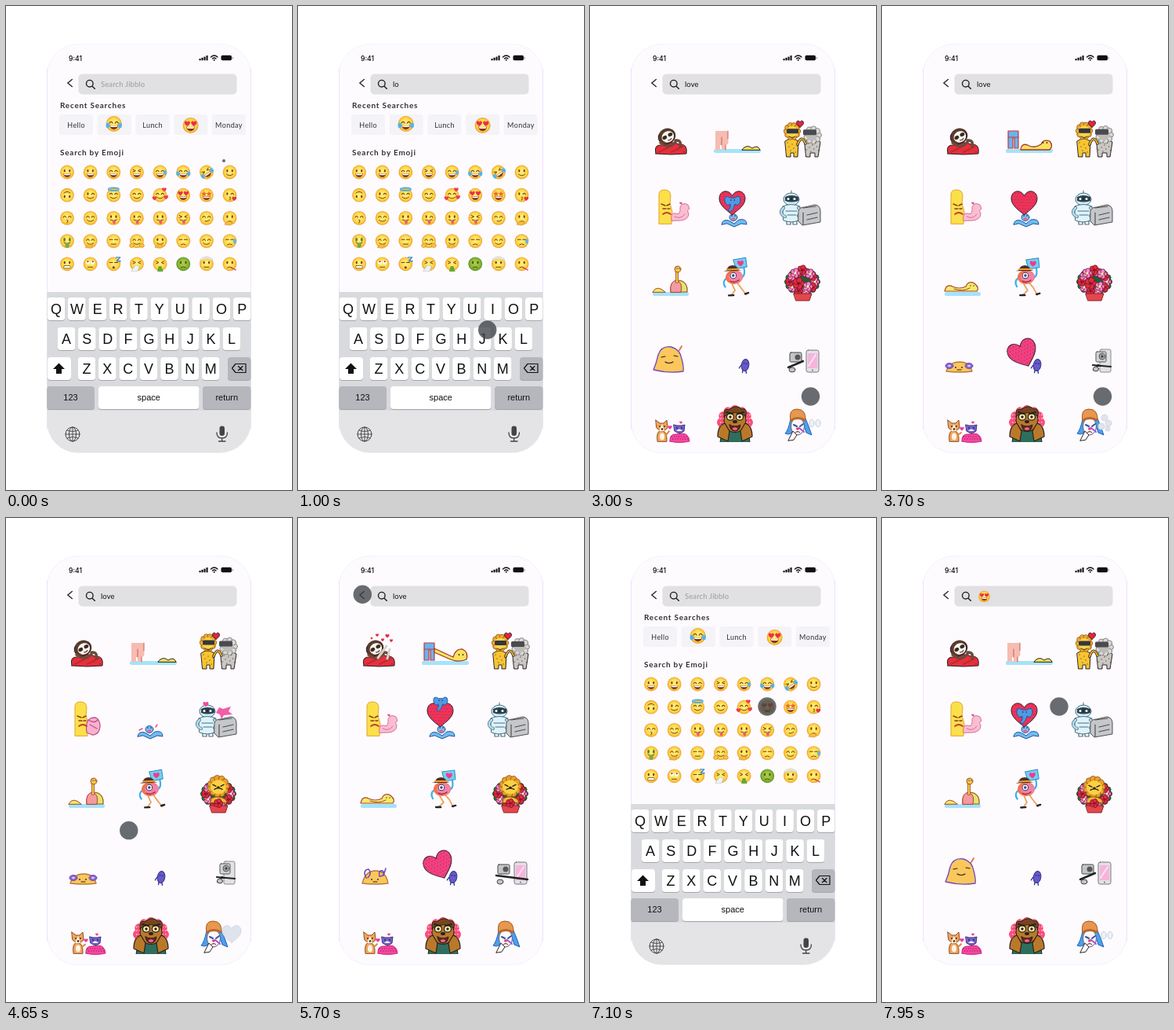
An HTML page with a canvas for the animation above (8000 ms loop, 365 by 616 pixels).

```html
<!DOCTYPE html>
<html lang="en">
<head>
<meta charset="utf-8">
<title>Sticker search</title>
<style>
html, body { margin: 0; width: 100%; height: 100%; overflow: hidden; background: #fff; }
canvas { display: block; }
</style>
</head>
<body>
<canvas id="stage" width="365" height="616"></canvas>
<script>
const c = document.getElementById('stage').getContext('2d');
const LOOP = 8000, TAU = Math.PI * 2, INK = '#2b2024', PAPER = '#fefbff', LATO = 'Lato, sans-serif', ARIAL = '"Liberation Sans", sans-serif';

// ---------- drawing helpers ----------
function paint(p, fill, stroke, w = 1) {
  if (fill) { c.fillStyle = fill; c.fill(p); }
  if (stroke) { c.strokeStyle = stroke; c.lineWidth = w; c.stroke(p); }
}
const path = (d, fill, stroke, w) => paint(new Path2D(d), fill, stroke, w);
function disc(x, y, rx, fill, ry = rx, stroke, w) {
  const p = new Path2D();
  p.ellipse(x, y, rx, ry, 0, 0, TAU);
  paint(p, fill, stroke, w);
}
function box(x, y, w, h, r, fill, stroke, lw) {
  const p = new Path2D();
  p.roundRect(x, y, w, h, r);
  paint(p, fill, stroke, lw);
}
function text(s, x, y, font, fill, align = 'left', spacing = 0) {
  c.font = font; c.fillStyle = fill; c.textAlign = align;
  c.letterSpacing = spacing + 'px';
  c.fillText(s, x, y);
}
function at(x, y, scale, turn, draw) {
  c.save(); c.translate(x, y); c.rotate(turn); c.scale(scale, scale); draw(); c.restore();
}
function ring(x, y, rx, ry, count, r, fill, stroke, w) {
  for (let i = 0; i < count; i++) {
    const angle = i * TAU / count;
    disc(x + rx * Math.cos(angle), y + ry * Math.sin(angle), r, fill, r, stroke, w);
  }
}
const HEART = 'M0 .95C-.5 .55-1 .2-1-.3C-1-.95-.25-1.05 0-.5C.25-1.05 1-.95 1-.3C1 .2 .5 .55 0 .95Z';
const heart = (x, y, s, fill, stroke, turn = 0) =>
  at(x, y, s, turn, () => path(HEART, fill, stroke, 1 / s));
function dottedHeart(x, y, s, fill, dot, turn = 0) {
  heart(x, y, s, fill, INK, turn);
  at(x, y, s, turn, () => {
    c.clip(new Path2D(HEART));
    for (let i = 0; i < 90; i++) disc(i % 10 * .22 - 1 + (i / 10 & 1) * .11, (i / 10 | 0) * .23 - .9, .045, dot);
  });
}

// ---------- emoji: eyes, mouth, extras ----------
const EMOJI = [
  'oG oG ^G xG ^GS ^GT xGTR os', 'osU ws ^sH ^s ^sL hG sG wkP',
  '^k ^st ot wt ot xt ^m onK', 'otM ^sK -f ^sA osK -n ^s -nS',
  'og rf -oZ xfN xoV onG ofB onE'].map(row => row.split(' '));
const BROWN = '#6b3d12';

function emoji(x, y, r, [eyes, mouth, ...more]) {
  const has = k => more.includes(k);
  const turn = has('U') ? Math.PI : has('R') ? -.6 : 0;
  at(x, y, r, turn, () => {
    c.lineCap = 'round';
    const g = c.createRadialGradient(0, -.15, .1, 0, 0, 1);
    (has('G') ? ['#a9cf45', '#85b637', '#578f24'] : ['#fff07c', '#fdd446', '#eb9d2b'])
      .forEach((k, i) => g.addColorStop([0, .72, 1][i], k));
    disc(0, 0, 1, g);
    for (const s of [-1, 1]) {
      c.save(); c.translate(s * .36, -.2); c.scale(s, 1);
      if (eyes === 'h') heart(.06, -.04, .36, '#ec2f48');
      else if (eyes === 's') path('M0-.4L.11-.12.4-.1.18.1.26.36 0 .22-.26.36-.18.1-.4-.1-.11-.12Z', '#ec6a2e');
      else if (eyes === '^' || eyes === 'w' && s > 0) path('M-.2 .1Q0-.22 .2 .1', null, BROWN, .12);
      else if (eyes === 'x') path('M.2-.18L-.18 0 .2 .16', null, BROWN, .11);
      else if (eyes === '-') path('M-.22 0H.22', null, BROWN, .12);
      else if (eyes === 'r') { disc(0, 0, .27, '#fff'); disc(0, -.14, .12, BROWN); }
      else disc(0, 0, .12, BROWN, .2);
      c.restore();
    }
    if (mouth === 'G') {
      path('M-.56 .16Q0 .26 .56 .16Q.46 .72 0 .72T-.56 .16Z', '#86361d');
      path('M-.5 .19Q0 .28 .5 .19L.42 .38Q0 .44-.42 .38Z', '#fff');
    }
    else if (mouth === 's') path('M-.45 .3Q0 .68 .45 .3', null, BROWN, .11);
    else if (mouth === 'f') path('M-.35 .45H.35', null, BROWN, .11);
    else if (mouth === 'n') path('M-.32 .52Q0 .3 .32 .52', null, BROWN, .11);
    else if (mouth === 'm') path('M-.2 .45Q.2 .55 .42 .3', null, BROWN, .11);
    else if (mouth === 'k') path('M-.05 .25Q.3 .32 0 .45Q.3 .58-.05 .68', null, BROWN, .1);
    else if (mouth === 'o') disc(0, .5, .17, '#7a3a12');
    else if (mouth === 'g') box(-.5, .25, 1, .36, .15, '#fff', BROWN, .08);
    else { path('M-.45 .25Q0 .55 .45 .25', null, BROWN, .11); disc(.08, .56, .22, '#ee5a6c', .28); }
    if (has('T')) for (const s of [-1, 1]) disc(s * .78, .2, .24, '#4fb4f0', .32);
    if (has('S')) disc(.72, .05, .2, '#55b7ee', .34);
    if (has('H')) disc(0, -.85, .75, null, .2, '#45a9e4', .18);
    if (has('L')) [[-.8, .45], [.85, .3], [.6, -.8]].forEach(p => heart(...p, .32, '#ee3b50'));
    if (has('P')) heart(.65, .5, .33, '#e8304a');
    if (has('K')) path('M-.7 .9L-.25 .5 .3 .55Q.5 .65 .1 1Z', '#f9bd40', '#d58e2b', .08);
    if (has('A')) for (const s of [-1, 1]) disc(s * .72, .65, .33, '#fbc544', .28, '#c77b1c', .07);
    if (has('M')) { disc(0, .62, .28, '#74ac45', .36); path('M-.4-.4V0M.4-.4V0', null, '#4e8f31', .2); }
    if (has('V')) path('M-.22 .35H.22L.45 1.1H-.4Z', '#65a833');
    if (has('N')) path('M-.8 1L-.2 .2 .4 .3 .1 1Z', '#eef3f7', '#b8c5cf', .07);
    if (has('B')) path('M-.9-.4Q0-1.1 .9-.4L.8-.75Q0-1.3-.8-.75Z', '#f3efe6', '#c9c0ae', .08);
    if (has('E')) path('M.15 .5L.85 .85', null, '#d94d4d', .17);
    if (has('Z')) path('M.35-.95H.95L.45-.4H1', null, '#3f8fd0', .16);
  });
}

// ---------- phone chrome ----------
function phoneShape() {
  const p = new Path2D();
  p.roundRect(52.5, 48.5, 260, 520, 39);
  return p;
}
function phone() {
  paint(phoneShape(), PAPER, '#f7f2fd');
  path('M52.500 80V538M312.500 80V538', null, '#ece4f8', 1);
}
function header(query) {
  text('9:41', 80, 69.700, '500 8.6px Inter, sans-serif', '#000');
  for (let i = 0; i < 4; i++) box(246.5 + i * 3, 67 - i * 1.3, 2.1, 2.3 + i * 1.3, .5, '#111');
  path('M261.500 65Q265.700 61 270 65M263.500 67Q265.700 65 268 67', null, '#111', 1.3);
  disc(265.700, 68.800, 1, '#111');
  box(274.500, 62.800, 13.500, 6.500, 1.8, '#111');
  box(288.700, 65, 1, 2.600, .5, '#777');
  c.lineCap = 'round';
  path('M84.300 93.500L78.800 98 84.300 102.500', null, '#222', 1.4);
  box(92.500, 86.500, 202, 26, 5, '#e1e0e3');
  disc(106.800, 98.700, 4.300, null, 4.300, '#222', 1.4);
  path('M110.200 102.200L113.300 105.300', null, '#222', 1.5);
  if (query === 'emoji') emoji(130.500, 100, 7.300, 'hG');
  else text(query || 'Search Jibblo', 121, 103, '9.5px ' + LATO, query ? '#111' : '#9b9a9f', 'left', .1);
}

function key(label, x, y, w, fill = '#fff', size = 18, h = 29) {
  box(x, y + 1, w, h, 4, '#a5a7ac');
  box(x, y, w, h, 4, fill);
  text(label, x + w / 2, y + h / 2 + size * .36, size + 'px ' + ARIAL, '#111', 'center');
}
function keyboardScreen() {
  for (const [y, s] of [[130, 'Recent Searches'], [190, 'Search by Emoji']])
    text(s, 69, y, 'bold 10px ' + LATO, '#333', 'left', .75);
  ['Hello', 'GT', 'Lunch', 'hG', 'Monday'].forEach((s, i) => {
    const x = 68 + i * 48.700;
    box(x, 138, 43, 26, 3, '#f4f3f7');
    if (i === 1) emoji(x + 21, 150, 10, '^GT');
    else if (i === 3) emoji(x + 21.500, 152, 10, 'hG');
    else text(s, x + 21.700, 154.500, '9px ' + LATO, '#333', 'center', .4);
  });
  EMOJI.forEach((row, j) => row.forEach((e, i) => emoji(78 + i * 29.650, 211.500 + j * 29.200, 8.900, e)));

  c.save();
  c.clip(phoneShape());
  box(52, 364, 262, 151, 0, '#d9dade');
  box(52, 515, 262, 55, 0, '#e4e4e6');
  [['QWERTYUIOP', 64], ['ASDFGHJKL', 77], ['ZXCVBNM', 103]].forEach(([row, x], j) =>
    [...row].forEach((ch, i) => key(ch, x - 11.300 + i * 26.370, 371 + j * 38, 22.600)));
  key('', 53, 447, 30);
  path('M67.500 454.500L75 462H71V468H64V462H60Z', '#111');
  key('', 283, 447, 29.500, '#b5b7bc');
  path('M288.500 461L293 455.500H306V466.500H293Z M296.500 458.500L302 463.700M302 458.500L296.500 463.700', null, '#111', 1.2);
  key('123', 52, 484, 61, '#b5b7bc', 11);
  key('space', 118, 484, 128.500, '#fff', 11);
  key('return', 251, 484, 61.500, '#b5b7bc', 11);
  for (const rx of [9, 4.500]) disc(85, 545, rx, null, 9, '#444', 1);
  path('M76 545H94M85 536V554M78 540Q85 543 92 540M78 550Q85 547 92 550', null, '#444', .9);
  box(272.500, 534.500, 6.500, 12.500, 3.250, '#444');
  path('M269 543Q269 550 275.700 550T282.500 543M275.700 550V554M271.500 554H280', null, '#444', 1.3);
  c.restore();
}

// ---------- stickers ----------
const eyesAt = (x, y, gap, r = 1) => [-gap, gap].forEach(d => disc(x + d, y, r, INK));
const water = (x, y, w) => box(x, y, w, 5, 2, '#a5e3f8');

function sloth(b) {
  path('M84 188Q81 176 91 177Q103 171 114 176Q125 175 123 188Q104 190 84 188Z', '#e52f3c', INK);
  for (let i = 0; i < 18; i++) disc(86 + i * 2, 179 + i * 7 % 8, .7, '#7d1522');
  at(98, 166, 1, -.5, () => {
    disc(0, 0, 11, '#5d3b2b', 9.500, INK);
    disc(1, 1, 8, '#fbf6ec', 7);
    disc(-3, 0, 3, '#3a2a26', 2.300);
    disc(5, 0, 3, '#3a2a26', 2.300);
    path('M-1 5Q2 7 4 5', null, INK);
  });
  path('M90 174Q101 183 109 173M109 171Q117 170 115 179', null, '#6d4a38', 3.500);
  if (b > 2300) {
    path('M102 178L113 163M114 179L117 167', null, '#d9d2ca', 3);
    [[101, 149, 2], [114, 150, 2.500], [108, 155, 2], [119, 156, 2], [94, 153, 1.500]].forEach(p => heart(...p, '#e52f3c'));
  }
}
function slide(a) {
  water(158, 182, 60);
  if (a < 600 || a > 1800) {
    path('M160 159H176V169Q178 176 173 177V183H168V177H166V183H160Z', '#f7bcb1');
    path('M176 159V169M168 167V177M173 177V183', null, '#c25e58');
    path('M194 183Q200 175 207 181Q214 176 217 183Z', '#f4e05c', INK);
    return;
  }
  path('M161 159H174V181H169V168H167V181H161Z', '#68b5ee', '#c9363e', 1.2);
  path('M161 167H174', null, '#c9363e');
  if (a < 1000) path('M174 166L198 177Q201 166 210 167Q218 171 215 180Q204 185 190 178L174 171Z', '#f8e35a', '#a8332f', 1.3);
  else path('M177 183Q178 174 186 177Q194 182 203 176Q206 169 214 172Q219 178 214 183Z', '#f8e35a', '#a8332f', 1.3);
  eyesAt(208, 174, 2.500, .9);
}
function friends(t) {
  const nod = Math.sin(t / 200) * .5;
  path('M249 172Q257 166 266 172L265 192H260V187H256V192H251Z', '#f7c531', INK);
  ring(258, 159 + nod, 7.500, 8, 10, 3.200, '#f0ab2c', '#8f5719', .8);
  disc(258, 160 + nod, 7.500, '#fbd54a');
  box(251, 156 + nod, 15, 6, 1.500, '#35363c');
  path('M254 166Q258 169 262 166', null, INK);
  path('M274 173Q283 166 294 173L291 192H287V187H281V192H276Z', '#c9c8c5', INK);
  ring(284, 164 + nod, 8, 8, 9, 3.500, '#d9d8d5', '#77746f', .8);
  disc(283, 164 + nod, 7, '#bebbb6');
  box(272, 157 + nod, 17, 7, 1.500, '#4a4b50');
  for (let i = 0; i < 16; i++) disc(i < 7 ? 252 + i * 2 : 263 + i * 1.900, 174 + i * 5 % 13, .7, '#65533a');
  path('M265 176Q270 163 275 175', null, INK, 3.500);
  path('M265 176Q270 163 275 175', null, '#e6ad2f', 2);
  heart(268, 150, 4.500, '#e8243a', INK);
}
function worms(b) {
  const near = b > 1200 && b < 1800;
  path('M88 277V240Q88 234 95 234Q103 234 103 242L102 251 105 262 104 277Z', '#fbe04a', '#e3a12d');
  if (near) {
    path('M103 273Q101 258 108 255Q118 251 120 263Q120 276 110 276Z', '#f7b3cd', '#c34f8e', 1.3);
    path('M105 257Q113 262 117 257M107 263L116 268', null, '#c34f8e', 1.3);
  } else {
    path('M104 273Q102 263 109 264Q116 267 115 256Q118 249 125 253L127 258Q123 260 126 264Q126 272 116 273Z', '#f9bed0', '#d96e98');
    path('M108 268Q116 272 121 265', null, '#d96e98');
    heart(116, 251, 1.800, '#ee4f8d');
  }
  path('M91 252L96 254M98 254L102 252M93 258H97M99 258H102', null, '#8f3b22', 1.4);
  path('M93 265Q98 261 103 265', null, '#c43d34', 1.8);
}
function elephant(x, y, s) {
  at(x, y, s, 0, () => {
    path('M-3-5Q-11-10-10 0Q-7 7-3 3Q-2 9-6 11L-3 13Q2 9 3 3Q8 7 10-1Q10-10 3-5Z', '#4e9be2', '#1f57a8');
    eyesAt(0, -2, 2.200, .8);
  });
}
function liftedHeart(a) {
  path('M168 278Q169 271 177 273L184 277 190 272Q200 270 200 278L193 277 184 281 175 277Z', '#70bdee', '#28539e');
  disc(183, 269, 5, '#78bff0', 4.500, '#28539e');
  disc(183, 271, 2.500, '#ef5f95', 1.600);
  eyesAt(183, 267, 2, .8);
  if (a > 1700) { path('M174 268L170 270M191 266L193 263', null, '#e94f8b', 1.5); return; }
  dottedHeart(181.500, 250, Math.min(1, .3 + a / 450) * 16.500, '#ed3552', '#bf1e8d');
  if (a > 300 && a < 600) elephant(182, 249, 1);
  else if (a >= 600 && a < 1000) elephant(182, 234, .9);
}
function robot(b) {
  const line = '#4b6f82';
  disc(257, 246, 10, '#d3eef7', 8, line);
  path('M249 243Q257 239 266 243V248Q257 251 249 248Z', '#29414e');
  eyesAt(257, 245.500, 0);
  [253, 261].forEach(x => disc(x, 245.500, 1.500, '#fff'));
  path('M257 238V235M246 255Q257 250 268 255L266 273Q256 277 247 273Z', '#def3fa', line);
  path('M247 257Q240 264 249 268M266 257Q272 262 266 267', null, line, 4);
  path('M247 257Q240 264 249 268M266 257Q272 262 266 267', null, '#b5dcec', 2.500);
  path('M250 261H264M252 266H263M251 274V278H256V275M259 275V278H264V274', null, line, 1.2);
  path('M266 261Q267 256 274 256L287 253Q294 254 294 261V275L271 279 266 274Z', '#c6c7ca', '#4f5052');
  path('M272 257L288 255M272 263V278M277 266L290 263M277 272L290 269', null, '#4f5052', 1.2);
  if (b > 1200 && b < 1800) {
    heart(255, 237, 3.500, '#f24a9c');
    path('M268 248L272 241 277 243 287 240 284 246 289 250 278 251 275 256 273 250Z', '#f45ba9');
  }
}
function swimmer(a) {
  water(80, 364, 46);
  const skin = '#f4e968', line = '#a8452f';
  if (a < 600 || a > 1800) {
    path('M103 364Q102 351 112 349Q125 350 124 364Z', '#dce96a', line, 1.2);
    path('M103 364Q101 350 111 349Q119 353 116 364Z', '#f49aa2', line);
    path('M111 351V337', null, line, 4);
    path('M111 351V337', null, '#f0cc45', 2.400);
    disc(112, 335, 4, '#f0cc45', 4, line);
    eyesAt(112.500, 334, 1.500, .7);
    path('M80 364Q85 354 96 364Z', skin, line);
  } else {
    path('M80 363Q82 353 90 357Q99 361 107 357Q110 349 118 353Q125 359 121 363Z', skin, line, 1.2);
    path('M92 360Q103 364 112 359', null, line);
    eyesAt(115, 356, 2, .7);
  }
}
function marcher(t) {
  const step = Math.sin(t / 130);
  at(184, 346, 1, step * .06, () => {
    path(`M-3 8L${2 + step * 2} 16 -5 22M4 7L${9 + step * 2} 12 14 22`, null, '#e9a35c', 1.8);
    path('M-8 22H-2M13 21L17 20', null, '#222', 2.400);
    path('M10 0Q15-3 13-12M-10 0Q-16 4-12 11', null, '#3bb2e6', 2.200);
    path('M0-23L16-25 17-13 3-11Z', '#74cef3', '#2f8bc0');
    heart(9, -18, 4, '#ee3c8b');
    disc(0, -1, 11, '#f4724f', 9);
    disc(2, -1, 9, '#f084a6', 7);
    disc(-1, -3, 3.800, '#fff', 3.800, '#5b3554');
    disc(-1, -3, 1.800, '#274d8d');
    path('M-5 4Q0 7 6 3', null, '#861f48', 1.2);
    path('M-9-10Q-8-16-1-16Q5-15 6-10L10-9H-13Z', '#4b3029');
    path('M-9-11H6', null, '#f0a130', 2);
  });
}
function flower(x, y, s, fill) {
  ring(x, y, s * .6, s * .6, 5, s * .55, fill, '#7b122c', .8);
  disc(x, y, s * .3, fill === '#e02d3e' ? '#8d1422' : '#fff0a0');
}
function bouquet(b) {
  ring(271, 351, 19, 14, 16, 3.500, '#2c7841', '#184b2a');
  disc(271, 350, 17, '#245a34', 14);
  for (let i = 0; i < 10; i++) flower(271 + 16 * Math.cos(i * .628), 351 + 12 * Math.sin(i * .628), 5, i % 2 ? '#e02d3e' : '#f08ad0');
  path('M260 366H283L280 375H263Z', '#e4464b', '#8a2530');
  if (b < 1000) {
    [[271, 336], [262, 340], [281, 341]].forEach(([x, y], i) => flower(x, y, 5.500, i ? '#f08ad0' : '#e02d3e'));
    flower(266, 353, 6.500, '#e02d3e');
    flower(278, 357, 5.500, '#f08ad0');
    return;
  }
  const y = 342 + Math.sin(b / 150) * .7;
  ring(271, y, 10, 10, 11, 4, '#eaa02b', '#8c5417', .8);
  disc(271, y + 1, 10, '#fbd143', 9);
  path(`M264 ${y - 2}L268 ${y}M274 ${y}L278 ${y - 2}M266 ${y + 4}Q271 ${y + 1} 276 ${y + 4}`, null, INK, 1.4);
  disc(271, y + 1.500, 1.800, INK, 1.200);
  path('M261 362Q261 354 271 355T282 362Z', '#f4b838', '#8c5417');
  flower(271, 363, 5, '#e02d3e');
}
function blob(a) {
  const line = '#7049bc', skin = '#fbc75c';
  if (a < 600) {
    at(81, 466, Math.min(1, .3 + a / 550), 0, () => {
      path('M0-3Q4-12 6-22Q10-34 23-32Q34-29 36-17Q39-6 38-1Q20 2 0-3Z', skin, line, 1.3);
      path('M10-19L15-20M26-21L31-20M15-13Q20-10 25-13', null, INK, 1.2);
      path('M33-28L36-33', null, '#ef7152', 2);
    });
    return;
  }
  const top = a < 950 ? 449 : 453;
  path(`M82 465Q86 ${top} 99 ${top}T115 465Q99 467 82 465Z`, skin, '#b87835', 1.3);
  if (a < 950) path('M87 458Q82 448 90 447Q95 452 89 458M104 456Q102 448 108 449Q112 455 105 456M112 446L109 455', null, line, 1.6);
  else for (const x of [86, 111]) { disc(x, 458, 5, '#8667d0', 3.500, line); disc(x, 458, 2, '#dfd0f2', 1.300); }
  eyesAt(98, 460, 4, .9);
  path('M96 463H101', null, INK);
}
function bean(a) {
  if (a > 600 && a < 1700) dottedHeart(180, 442, 18.500 * Math.min(1, (a - 500) / 180), '#f0417f', '#d52a70', -.4);
  at(198, 457, 1, .15, () => {
    disc(0, 0, 4.800, '#6659cb', 7.500, '#31308b');
    path('M-2 7V10M2 7L3 10M-5 1L-7 5', null, '#31308b', 1.3);
    eyesAt(0, -2, 1.800, .8);
  });
}
function camera(a) {
  if (a < 1000) {
    box(276, 438, 16, 28, 2.500, '#e3e1e7', '#77757c');
    box(278, 442, 12, 19, 0, '#f6b4da');
    path('M279 458L288 444', null, '#fbe3f2', 2);
    disc(284, 463.500, 1, '#777');
    box(255, 441, 15, 12, 1.500, '#c4c5c8', '#444');
    disc(265, 447, 3.500, '#55575b');
    path(a < 600 ? 'M253 460L272 452' : 'M253 455L293 460', null, '#222', 2.500);
    disc(258, 463, 4, '#c5c6c8', 3, '#444');
  } else {
    box(278, 437, 14, 29, 2, '#e2e2e4', '#8a8a8d');
    box(273, 440, 13, 13, 1.500, '#d3d4d6', '#55565a');
    disc(281, 446, 4, '#a5a7aa', 4, '#55565a');
    disc(281, 446, 1.700, '#444');
    path('M269 457L292 459M270 463L276 457', null, '#222', 2.200);
    disc(273, 462, 3.500, '#c5c6c8', 3, '#444');
  }
}
function corgi(t) {
  const wag = Math.sin(t / 180);
  path('M86 554Q84 541 91 540Q99 541 98 554Z', '#f0a55a', '#8a4e26');
  disc(92, 548, 3, '#fff4e5', 4.500);
  path('M84 527L89 531H94L98 527 99 537Q92 545 85 537Z', '#f0a55a', '#8a4e26');
  path('M92 532L95 541H88Z', '#fff4e5');
  disc(92, 538.500, 1.300, INK);
  eyesAt(92, 535, 3, .9);
  path(`M97 546L101 ${542 + wag}`, null, '#d88a43', 2);
  heart(102, 537 + wag, 2.600, '#ed3c96');
  heart(116, 530, 1.800, '#ed3c96');
  path('M102 554Q101 544 111 545Q126 541 127 554Q114 557 102 554Z', '#f7479f', '#c4247a');
  for (let i = 0; i < 14; i++) disc(104 + i * 1.600, 548 + i * 3 % 6, .7, '#a01a69');
  path('M107 533L111 534H117L121 533 120 541Q114 546 108 541Z', '#7463cb', '#3c3178');
  path('M110 541Q114 536 118 541Z', '#fff');
  eyesAt(114, 537, 3, .9);
}
function admirer(t) {
  c.save();
  c.beginPath(); c.rect(162, 508, 46, 47); c.clip();
  ring(185, 530, 17, 16, 12, 6, '#fb4d78');
  disc(185, 533, 20, '#fb4d78', 22);
  for (let i = 0; i < 130; i++) {
    const x = 163 + i % 13 * 3.700, y = 511 + (i / 13 | 0) * 4.700;
    if (Math.hypot(x - 185, y - 531) < 22) disc(x, y, .9, '#ffc2cf');
  }
  path('M166 555Q167 541 178 540H193Q204 541 204 555Z', '#2f6e5c', INK);
  disc(185, 527 + Math.sin(t / 220) * .6, 14, '#b97929', 15, INK, 1.2);
  path('M171 522Q170 511 177 514Q186 506 194 513Q201 511 199 522Q186 513 171 522Z', '#754719', INK);
  for (const x of [179, 191]) { disc(x, 523, 4.500, '#fff1b0', 4.200, INK, 1.3); disc(x, 523, 1.700, INK); }
  path('M174 517L182 519M188 519L196 517', null, INK, 2);
  disc(185, 529, 3, INK, 2);
  path('M178 533Q185 537 192 533Q191 541 185 541T178 533Z', '#6c2024', INK);
  disc(185, 538, 3, '#ef6b83', 1.800);
  path('M163 548Q163 534 172 531L178 541 176 554Z M207 548Q207 534 198 531L192 541 194 554Z', '#b97929', INK, 1.2);
  c.restore();
}
function breather(a) {
  path('M256 526Q253 540 249 544Q257 548 261 537L272 531 276 543 283 546Q279 534 275 525Z', '#4aa0ef', '#2460b4');
  disc(265, 535, 8.500, '#fff7f5', 11, '#685c74');
  path('M256 528Q253 513 264 513Q276 513 275 528Q265 523 256 528Z', '#e8974f', '#a05a26');
  path('M256 527Q265 521 275 527', null, '#b8692f', 2);
  path('M260 533L264 535M268 535L272 532', null, '#2d55aa', 2);
  disc(265, 538, 2, '#e9396f', 1.800);
  path('M262 543Q265 540 268 543', null, INK);
  path('M253 553L259 541 264 546 260 552Z', '#fff', INK);
  path('M267 537L273 542', null, '#a054d6', 2);
  const smoke = '#dfe4ec';
  if (a > 1800) heart(288, 529, 12, smoke, '#d2d8e2');
  else if (a > 1000) [[284, 524, 4], [289, 531, 4], [280, 535, 4], [288, 538, 3]].forEach(p => disc(...p, smoke, p[2], '#d2d8e2'));
  else if (a < 600) [[283, 531, 3], [291, 531, 3]].forEach(p => disc(...p, '#eef2f7', 4.500, '#c5d0dc'));
}
function resultScreen(t) {
  const a = t % 2500, b = t % 3000;
  sloth(b); slide(a); friends(t);
  worms(b); liftedHeart(a); robot(b);
  swimmer(a); marcher(t); bouquet(b);
  blob(a); bean(a); camera(a);
  corgi(t); admirer(t); breather(a);
}

// ---------- timeline ----------
const clamp = v => Math.max(0, Math.min(1, v));
const ease = v => v * v * (3 - 2 * v);
// start, end, destination, optional curve control
const MOVES = [
  [50, 450, 288, 423], [600, 800, 275, 385], [900, 1150, 182, 461], [1250, 1500, 117, 385],
  [1750, 1950, 281.5, 497], [3900, 5400, 82.3, 97.3, 132, 499], [6300, 7000, 226, 240]];
const TYPED = [550, 850, 1200, 1600];

function pointer(t) {
  let x = 278, y = 197;
  for (const [from, to, tx, ty, cx = (x + tx) / 2, cy = (y + ty) / 2] of MOVES) {
    if (t < from) break;
    const s = ease(clamp((t - from) / (to - from))), mix = (p, q, r) => (1 - s) ** 2 * p + 2 * s * (1 - s) * q + s * s * r;
    x = mix(x, cx, tx);
    y = mix(y, cy, ty);
  }
  disc(x, y, 2 + 9.700 * ease(clamp(t / 250)), 'rgba(61,67,70,.78)');
}
function queryAt(t) {
  if (t >= 7250) return 'emoji';
  return t < 5950 ? 'love'.slice(0, TYPED.filter(k => t >= k).length) : '';
}
function render(now) {
  const t = now % LOOP;
  const fade = from => clamp((t - from) / 150);
  const results = fade(2450) - fade(5900) + fade(7250);
  c.fillStyle = '#fff';
  c.fillRect(0, 0, 365, 616);
  c.lineJoin = c.lineCap = 'round';
  phone();
  if (results < 1) keyboardScreen();
  if (results > 0) {
    c.globalAlpha = results;
    phone();
    resultScreen(t);
    c.globalAlpha = 1;
  }
  header(queryAt(t));
  pointer(t);
  requestAnimationFrame(render);
}
requestAnimationFrame(render);
</script>
</body>
</html>
```
